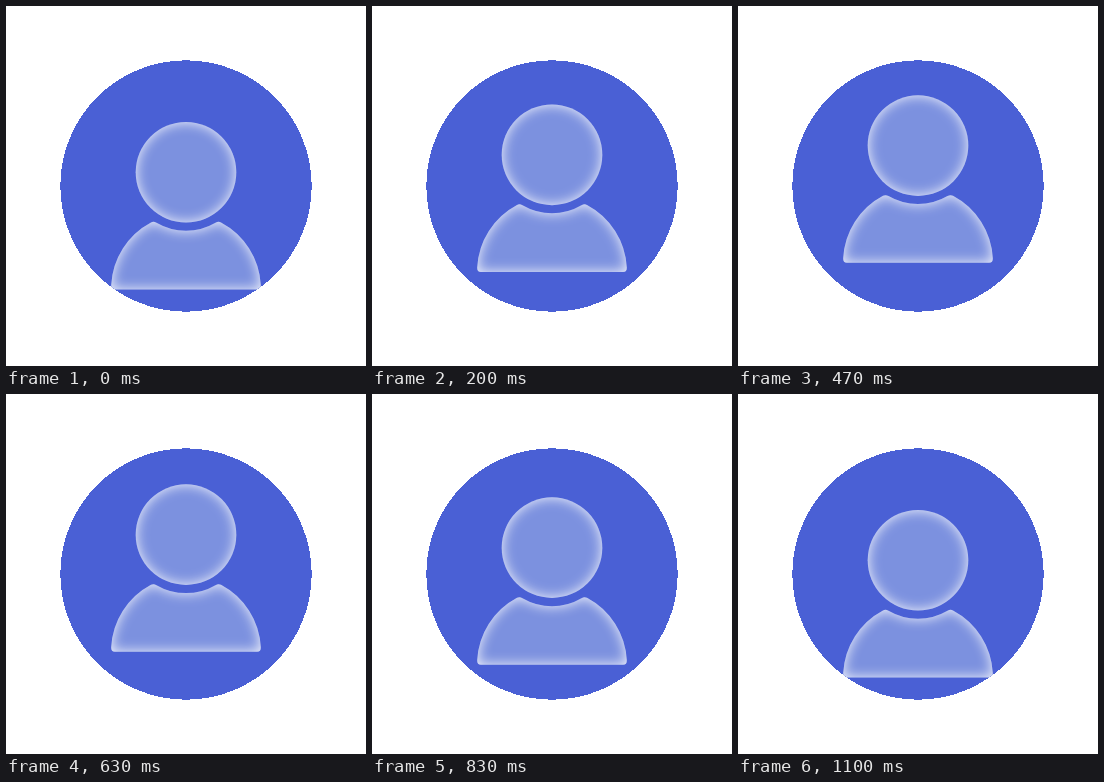
These frames come from a looping animation (360x360 px, 1.13 s). An HTML page:

```html
<!DOCTYPE html>
<html lang="en">
<head>
<meta charset="utf-8">
<title>Profile avatar</title>
<style>
  html, body { margin: 0; width: 100%; height: 100%; overflow: hidden; background: #fff; }
  svg { display: block; width: 100%; height: 100%; }
</style>
</head>
<body>
<svg viewBox="0 0 360 360">
  <defs>
    <clipPath id="disc"><circle cx="180" cy="180" r="125.7"/></clipPath>
    <!-- White glow that fades inwards from the outline -->
    <filter id="glass" x="-30%" y="-40%" width="160%" height="180%" color-interpolation-filters="sRGB">
      <feComponentTransfer in="SourceAlpha" result="outside">
        <feFuncR type="linear" slope="0" intercept="1"/>
        <feFuncG type="linear" slope="0" intercept="1"/>
        <feFuncB type="linear" slope="0" intercept="1"/>
        <feFuncA type="table" tableValues="1 0"/>
      </feComponentTransfer>
      <feGaussianBlur in="outside" stdDeviation="6.5"/>
      <feComposite in2="SourceAlpha" operator="in"/>
    </filter>
    <circle id="head" cx="180" cy="166.3" r="50.3"/>
    <path id="body" d="M109 283.5 Q105 283.5 105.2 279 A75 75 0 0 1 145 216.5
      Q147.5 215 150.5 216.8 A58.5 58.5 0 0 0 209.5 216.8
      Q212.5 215 215 216.5 A75 75 0 0 1 254.8 279 Q255 283.5 251 283.5 Z"/>
  </defs>
  <circle cx="180" cy="180" r="125.7" fill="#4a60d5" shape-rendering="crispEdges"/>
  <g clip-path="url(#disc)">
    <g id="person" fill="#7c91df">
      <use href="#head"/>
      <use href="#body"/>
      <use href="#head" filter="url(#glass)" opacity=".92"/>
      <use href="#body" filter="url(#glass)" opacity=".92"/>
    </g>
  </g>
</svg>
<script>
  const LOOP = 1130, STEP = 1000 / 30, RISE = 26.9;
  const UP_END = 530, DOWN_START = 550, DOWN_END = 1100;
  const person = document.getElementById('person');
  const clamp = v => Math.min(1, Math.max(0, v));

  function bezier(x1, y1, x2, y2) {
    const at = (s, a, b) => 3 * (1 - s) * (1 - s) * s * a + 3 * (1 - s) * s * s * b + s * s * s;
    return x => {
      let lo = 0, hi = 1;
      for (let i = 0; i < 24; i++) {
        const mid = (lo + hi) / 2;
        if (at(mid, x1, x2) < x) lo = mid; else hi = mid;
      }
      return at((lo + hi) / 2, y1, y2);
    };
  }

  const easeUp = bezier(.25, .1, .25, 1);
  const easeDown = p => p < .5 ? 2 * p * p : 1 - 2 * (1 - p) * (1 - p);

  function draw(ms) {
    // Motion advances at 30 steps per second, on 10 ms ticks
    const t = Math.floor((ms % LOOP + 3.4) / STEP) * STEP;
    const up = easeUp(clamp(t / UP_END));
    const down = easeDown(clamp((t - DOWN_START) / (DOWN_END - DOWN_START)));
    person.setAttribute('transform', `translate(0 ${(-RISE * (up - down)).toFixed(2)})`);
  }

  let start;
  function tick(now) {
    start ??= now;
    draw(Math.max(0, now - start));
    requestAnimationFrame(tick);
  }
  draw(0);
  requestAnimationFrame(tick);
</script>
</body>
</html>
```
